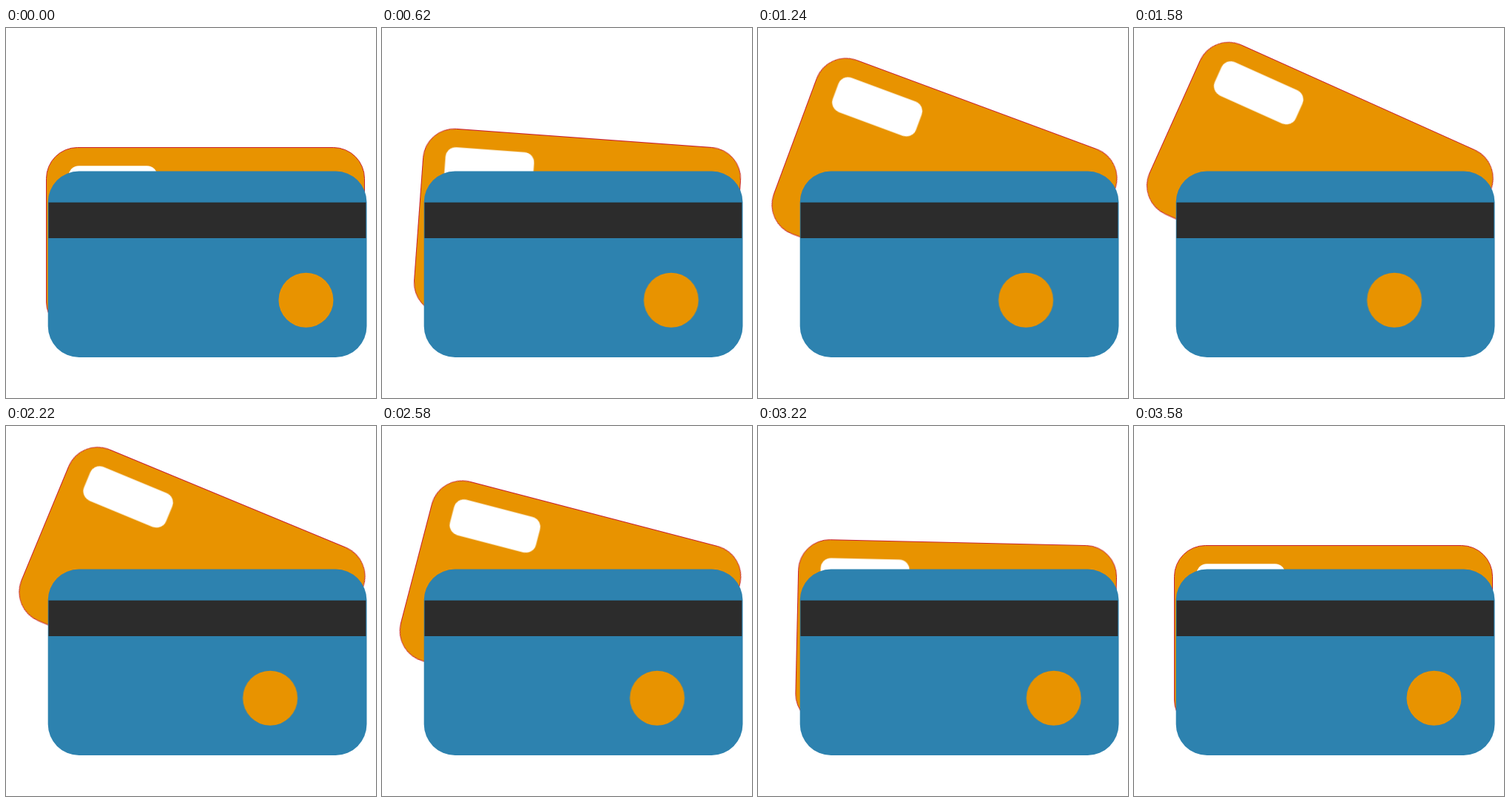
Animation, 500 px wide and 500 px high, one loop 3600 ms. Source, as an HTML page:

```html
<!DOCTYPE html>
<html lang="en">
<head>
<meta charset="utf-8">
<title>Cards</title>
<style>
  html, body {
    margin: 0;
    width: 100%;
    height: 100%;
    overflow: hidden;
    background: #fff;
  }
  svg {
    display: block;
    width: 100vw;
    height: 100vh;
  }
  .back {
    transform-origin: 444px 205px;
    animation: tilt 3.6s cubic-bezier(.6, 0, .47, 1) infinite;
  }
  .badge {
    animation: slide 3.6s cubic-bezier(.37, 0, .63, 1) infinite;
  }
  /* The return half mirrors the outward easing. */
  @keyframes tilt {
    50% {
      transform: rotate(24.7deg);
      animation-timing-function: cubic-bezier(.53, 0, .4, 1);
    }
    0%, 100% { transform: rotate(0deg); }
  }
  @keyframes slide {
    0%, 100% { transform: translateX(0); }
    50% { transform: translateX(-55.5px); }
  }
</style>
</head>
<body>
<svg viewBox="0 0 500 500">
  <g class="back">
    <rect x="54.5" y="161.5" width="430" height="250.5" rx="42" fill="#e89300" stroke="#c7202f"/>
    <rect x="84.5" y="186.2" width="120" height="49.5" rx="14" fill="#fff"/>
  </g>
  <rect x="56.7" y="193.5" width="430.8" height="251.5" rx="42" fill="#2d82af"/>
  <rect x="57.5" y="235.7" width="428.8" height="48.3" fill="#2c2c2c"/>
  <circle class="badge" cx="405.4" cy="367.7" r="37" fill="#e89300"/>
</svg>
</body>
</html>
```
